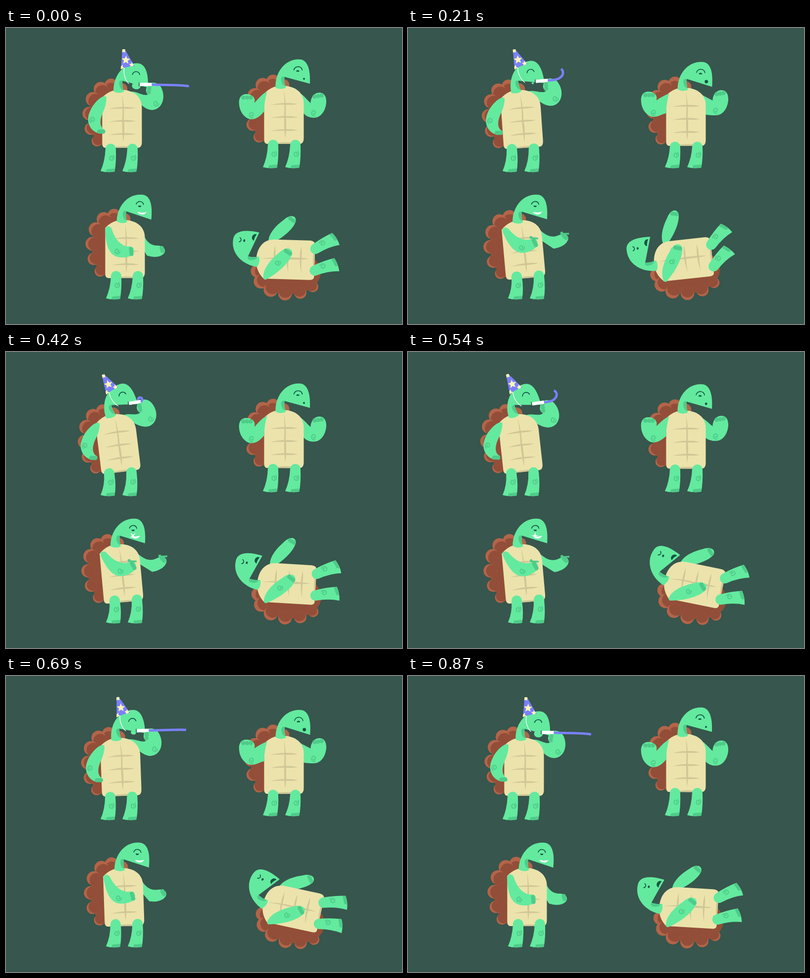
Write an HTML page with a canvas that moves like this. It is 800x600 px and loops after 900 ms.

```html
<!DOCTYPE html>
<html lang="en">
<head>
<meta charset="utf-8">
<title>Four turtles</title>
<style>
  html, body { margin: 0; width: 100%; height: 100%; overflow: hidden; background: #37564d; }
  canvas { display: block; width: 800px; height: 600px; }
</style>
</head>
<body>
<canvas id="stage" width="800" height="600"></canvas>
<script>
const ctx = document.getElementById('stage').getContext('2d');
const LOOP = 900, STEP = 30;
const BG = '#37564d', GREEN = '#63ea9f', DARK = '#4fcb89', INK = '#145643';
const SHELL = '#924e38', SHELL_LIGHT = '#b46449', CREAM = '#ebe3ab', CREASE = '#d0c697';
const PURPLE = '#7b80fa', STAR = '#fbf6b5', WHITE = '#fff';

const rad = d => d * Math.PI / 180;
const clamp = v => Math.max(0, Math.min(1, v));
const wrap = t => (t % LOOP + LOOP) % LOOP;
function ease(v) {
  const u = clamp(v);
  return u * u * u * (u * (6 * u - 15) + 10);
}
// Rises from 0 to 1 between a and b, falls back between c and d.
const pulse = (t, a, b, c, d) => ease((t - a) / (b - a)) * (1 - ease((t - c) / (d - c)));
// Sways endlessly between two values reached at the given times.
function swing(t, low, high, lowAt, highAt) {
  const rise = wrap(highAt - lowAt), u = wrap(t - lowAt);
  const p = u < rise ? u / rise : (LOOP - u) / (LOOP - rise);
  return low + (high - low) * (1 - Math.cos(Math.PI * p)) / 2;
}

function at(x, y, deg, draw) {
  ctx.save();
  ctx.translate(x, y);
  ctx.rotate(rad(deg));
  draw();
  ctx.restore();
}
const turn = (x, y, deg, draw) => at(x, y, deg, () => { ctx.translate(-x, -y); draw(); });

function fill(path, color) {
  ctx.fillStyle = color;
  ctx.fill(new Path2D(path));
}
function line(path, color, width) {
  ctx.strokeStyle = color;
  ctx.lineWidth = width;
  ctx.stroke(new Path2D(path));
}
function arc(x, y, r, from, to) {
  ctx.strokeStyle = INK;
  ctx.lineWidth = 1.7;
  ctx.beginPath();
  ctx.arc(x, y, r, rad(from), rad(to));
  ctx.stroke();
}
function dot(x, y, r, color, ry = r) {
  ctx.fillStyle = color;
  ctx.beginPath();
  ctx.ellipse(x, y, r, ry, 0, 0, 7);
  ctx.fill();
}
// A row of three toes that starts at x, y.
function toes(x, y, dx, dy) {
  for (let i = 0; i < 3; i++) dot(x + i * dx, y + i * dy, 4.3, DARK);
}
function spiral(x, y, start = 0) {
  const path = new Path2D();
  for (let i = 0; i <= 30; i++) {
    const a = start + i * .28, r = 6.5 * (1 - i / 40);
    path.lineTo(x + r * Math.cos(a) * .9, y + r * Math.sin(a));
  }
  line(path, DARK, 2);
}
function star(x, y, points, outer, inner, color, start = 0) {
  ctx.fillStyle = color;
  ctx.beginPath();
  for (let i = 0; i < points * 2; i++) {
    const a = start - Math.PI / 2 + i * Math.PI / points, r = i % 2 ? inner : outer;
    ctx.lineTo(x + r * Math.cos(a), y + r * Math.sin(a));
  }
  ctx.fill();
}

// Lobes sit on an ellipse; their shaded side faces its centre.
function shell(dx = 0, dy = 0) {
  const cx = -22 + dx, cy = -63 + dy;
  dot(cx, cy, 45, SHELL, 64);
  for (let i = 0; i < 7; i++) {
    const a = rad(-62 - 28 * i), r = 12 + 2.5 * Math.sin(i * .6), shade = 9.5 - i;
    const x = cx + 44.5 * Math.cos(a), y = cy + 64 * Math.sin(a);
    ctx.save();
    ctx.beginPath();
    ctx.arc(x, y, r, 0, 7);
    ctx.clip();
    dot(x, y, r + 1, SHELL_LIGHT);
    dot(x - shade * Math.cos(a), y - shade * Math.sin(a), r, SHELL);
    ctx.restore();
  }
}
function plastron() {
  fill('M-40,-9V-102Q-25,-118 -4,-118C22,-118 40,-105 40,-82V-12Q40,0 31,0H-33Q-40,0 -40,-9Z', CREAM);
  for (let y = -81; y < 0; y += 26.5) {
    fill(`M-27,${y + 2}Q0,${y - 5} 28,${y}Q20,${y + 2} 5,${y + 1.5}Q-12,${y + 1} -27,${y + 2}Z`, CREASE);
  }
  fill('M0,-109Q5,-85 3.5,-60Q6,-32 2.5,-11Q0,-30 .5,-58Q2,-84 0,-109Z', CREASE);
}
// Foot corner at x, y; the hip may drift by dx, dy.
function leg(x, y, dx = 0, dy = 0) {
  const hx = 20.5 + dx, hy = -45 + dy;
  ctx.save();
  ctx.translate(x, y);
  const shape = `M0,0Q9,-20 ${hx - 10.5},${hy}A10.5,10.5 0 0 1 ${hx + 10.5},${hy}Q32,-18 28.5,1Q14,4 0,0Z`;
  fill(shape, GREEN);
  ctx.clip(new Path2D(shape));
  toes(15.5, 0, 5.2, -.5);
  spiral(22 + dx * .6, -27 + dy * .5, -1);
  ctx.restore();
}
function head(deg, face) {
  turn(-6, -112, deg, () => {
    fill('M-17,-115C-18,-143 0,-171.5 30,-171.5C46,-172 54,-155 52.5,-122L1,-136C0,-127 2,-121 4,-114Q-6,-109 -17,-114Z', GREEN);
    fill('M1,-136C-5,-138 -7,-133 -5,-126Q-3,-118 3,-117Q0,-126 1,-136L12,-133Q6,-136 1,-136Z', DARK);
    face();
  });
}

function hat() {
  const cone = 'M1,-200H6L25.5,-166Q11,-165 -2.5,-159.5Z';
  ctx.save();
  ctx.clip(new Path2D(cone));
  fill(cone, PURPLE);
  star(8, -178, 5, 9, 4, STAR, .05);
  star(3, -198, 5, 6, 3.5, STAR);
  star(20, -168, 5, 6, 2.8, STAR);
  star(-1, -162, 5, 7, 3.4, STAR, .4);
  ctx.restore();
  line('M5,-162C2,-151 7,-136 14,-130', WHITE, 1.3);
}
function horn(t, lean) {
  const rolled = pulse(t, 0, 380, 430, 700), open = 1 - rolled;
  const piece = (77 - 48 * rolled) / 60;
  const curl = rad(190 * Math.sqrt(rolled) + 210 * rolled ** 12 - 8 * open ** 8);
  at(35.5, -128.5, 8 * lean, () => {
    const strip = new Path2D();
    let x = 23, y = .5;
    strip.moveTo(x, y);
    for (let i = 0; i < 60; i++) {
      const heading = .02 - curl * ((i + .5) / 60) ** (1.1 + 4 * open);
      x += Math.cos(heading) * piece;
      y += Math.sin(heading) * piece;
      strip.lineTo(x, y);
    }
    line(strip, PURPLE, 4.8);
    ctx.fillStyle = WHITE;
    ctx.fillRect(0, -3.3, 24.5, 6.6);
    ctx.fillStyle = INK;
    ctx.fillRect(-1.5, -4, 1.5, 8);
  });
}

function partyTurtle(t) {
  const lean = pulse(t, -50, 435, 435, 850);
  const body = draw => at(234.5 - 1.5 * lean, 243, -7 * lean, draw);
  body(() => {
    shell();
    turn(20, -112, -11 * lean, () => {
      fill('M18,-114C32,-115 42,-104 52,-108C47,-114 47,-121 54,-128C60,-136 77,-132 81,-118C87,-102 82,-85 70,-79C56,-72 43,-82 32,-94Z', GREEN);
      toes(54, -113, 1, -6.5);
      spiral(68.5, -90);
    });
    plastron();
    head(-10.5 * lean, () => {
      const puff = clamp(1 - lean * 1.3);
      dot(29, -126, 9 * puff, GREEN, 7.5 * puff);
      arc(28.5, -147, 7.5, 188, 352);
      hat();
      horn(t, lean);
    });
  });
  leg(191, 290, -3 * lean, lean);
  leg(235, 290, -2 * lean, -lean);
  body(() => turn(-35, -102, 9 * lean, () => {
    fill('M-31.5,-103C-38,-112 -68.5,-83 -68.5,-57C-67.5,-37 -50,-26 -38,-30Q-32,-34 -35,-37C-46,-42 -45,-57 -39,-71Q-31,-88 -31.5,-103Z', GREEN);
    toes(-46, -33, 4, 0);
    spiral(-59.5, -57, 2);
  }));
}

function shruggingTurtle(t) {
  const bob = (1 - Math.cos(t / LOOP * 4 * Math.PI)) / 2, lift = -9 * bob;
  const y = v => v + lift;
  const body = draw => at(561.5, 235 + 4 * bob, 0, draw);
  body(() => {
    shell();
    fill(`M28,-106C42,-98 49,${y(-86)} 54,${y(-83)}C54,${y(-93)} 60,${y(-104)} 72,${y(-104)}
      C82,${y(-104)} 86,${y(-95)} 85.5,${y(-84)}C84,${y(-66)} 74,${y(-53)} 60,${y(-53)}Q46,${y(-53)} 38,-64Z`, GREEN);
    toes(62, y(-96), 7, -1);
    spiral(60.5, y(-63), 1);
    plastron();
    head(2.2 * bob, () => {
      arc(28.5, -148, 8.7, 188, 352);
      fill('M24.8,-146.5A3.2,3 0 0 1 31.2,-146.5Z', INK);
      dot(40.5, -132, 1.9 + 1.6 * bob, INK);
    });
  });
  leg(519, 282, 0, 4 * bob);
  leg(564, 282, 0, 4 * bob);
  body(() => {
    fill(`M-34,-106C-45,-102 -55,${y(-87)} -60,${y(-83)}C-56,${y(-93)} -64,${y(-101)} -76,${y(-101)}
      C-87,${y(-101)} -92,${y(-93)} -90.5,${y(-80)}C-89,${y(-62)} -76,${y(-50)} -66,${y(-50)}
      C-56,${y(-50)} -48,${y(-56)} -40,-66Q-40,-86 -34,-106Z`, GREEN);
    toes(-82, y(-94), 7.5, 0);
    spiral(-65, y(-59), 1);
  });
}

function pointingTurtle(t) {
  const lean = pulse(t, 0, 232, 489, 841);
  const reach = pulse(t, 60, 260, 489, 841);
  const spark = pulse(t, 180, 280, 480, 760);
  const point = clamp((reach - .4) / .5);
  const finger = (x, y) => {
    line(`M${x},${y}l${14 * point},${6.5 * point}`, DARK, 3.5);
    dot(x + 1, y - 1, 3 * point, DARK);
  };
  const body = draw => at(240.5 - 2.3 * lean, 507, -5.2 * lean, draw);
  body(() => {
    shell();
    turn(29, -97, -23 * reach, () => {
      fill('M31,-104C39,-82 45,-67 64,-66C77,-66 83,-59 80,-52C74,-42 58,-41 44,-46L30,-70Z', GREEN);
      toes(74, -61, 1, 3);
      finger(71.5, -66);
    });
    plastron();
    head(3.5 + 3.5 * lean, () => {
      arc(27.5, -150, 7.5, 188, 352);
      fill('M24.3,-149A3.2,3 0 0 0 30.7,-149Z', INK);
      fill('M23.5,-136Q33,-134 42,-137Q38,-130 31,-131.5Q26,-132 23.5,-136Z', WHITE);
      star(27.5, -137, 4, 8 * spark, 1.8 * spark, WHITE, rad((t - 300) * .375));
    });
  });
  leg(202, 548, -3 * lean, lean);
  leg(246, 548, -2 * lean, -lean);
  body(() => turn(-37, -104, -18 * reach, () => {
    fill('M-40,-98C-39,-65 -32,-43 -8,-42C6,-41 18,-45 18,-55C18,-63 12,-65 5,-64C-10,-67 -21,-80 -27,-100Q-31,-107 -38,-104Z', GREEN);
    toes(12, -59, .5, 5);
    spiral(-16, -55);
    finger(8, -66);
  }));
}

function fallenTurtle(t) {
  const rock = swing(t, -6.3, 13.3, 225, 615), tilt = rock - 90;
  const kick = pulse(wrap(t - 290), 0, 140, 450, LOOP);
  const flick = pulse(t, 630, 740, 760, 880);
  const limb = (x, y, angle, draw) => at(x, y, angle - tilt, draw);
  const arm = () => {
    fill('M-1,1C8,-12 30,-17 58,-14C76,-14 84,-4 78,4C70,13 38,17 0,5Z', GREEN);
    toes(71, -7, 1, 5);
  };
  const hindLeg = () => leg(-20.5, 45);
  at(621.5 + 1.15 * rock, 469.3 + 1.05 * rock, tilt, () => {
    shell(-3, 12);
    limb(33.5, -94, swing(t, -71, -12, 255, 630), () => {
      ctx.scale(.92, .92);
      arm();
    });
    plastron();
    head(6.5 + rock + .045 * rock * rock, () => {
      arc(31, -160, 4.5, 10, 170);
      dot(31, -149, 2.6, INK, 2);
      at(41, -128, 14, () => fill('M-7,0C-7,-9 7,-9 7,0Q0,-2 -7,0Z', INK));
    });
    limb(23.5, 1, -147 + 31 * kick + 32 * flick, hindLeg);
    limb(-20.5, 1, -146 + 44 * kick + 17 * flick, hindLeg);
    limb(-39, -102, swing(t, -66, -14, 230, 600), () => {
      arm();
      spiral(42, -2);
    });
  });
}

const start = performance.now();
function frame() {
  const t = Math.floor(wrap(performance.now() - start) / STEP) * STEP;
  ctx.fillStyle = BG;
  ctx.fillRect(0, 0, 800, 600);
  for (const draw of [partyTurtle, shruggingTurtle, pointingTurtle, fallenTurtle]) draw(t);
  requestAnimationFrame(frame);
}
requestAnimationFrame(frame);
</script>
</body>
</html>
```
